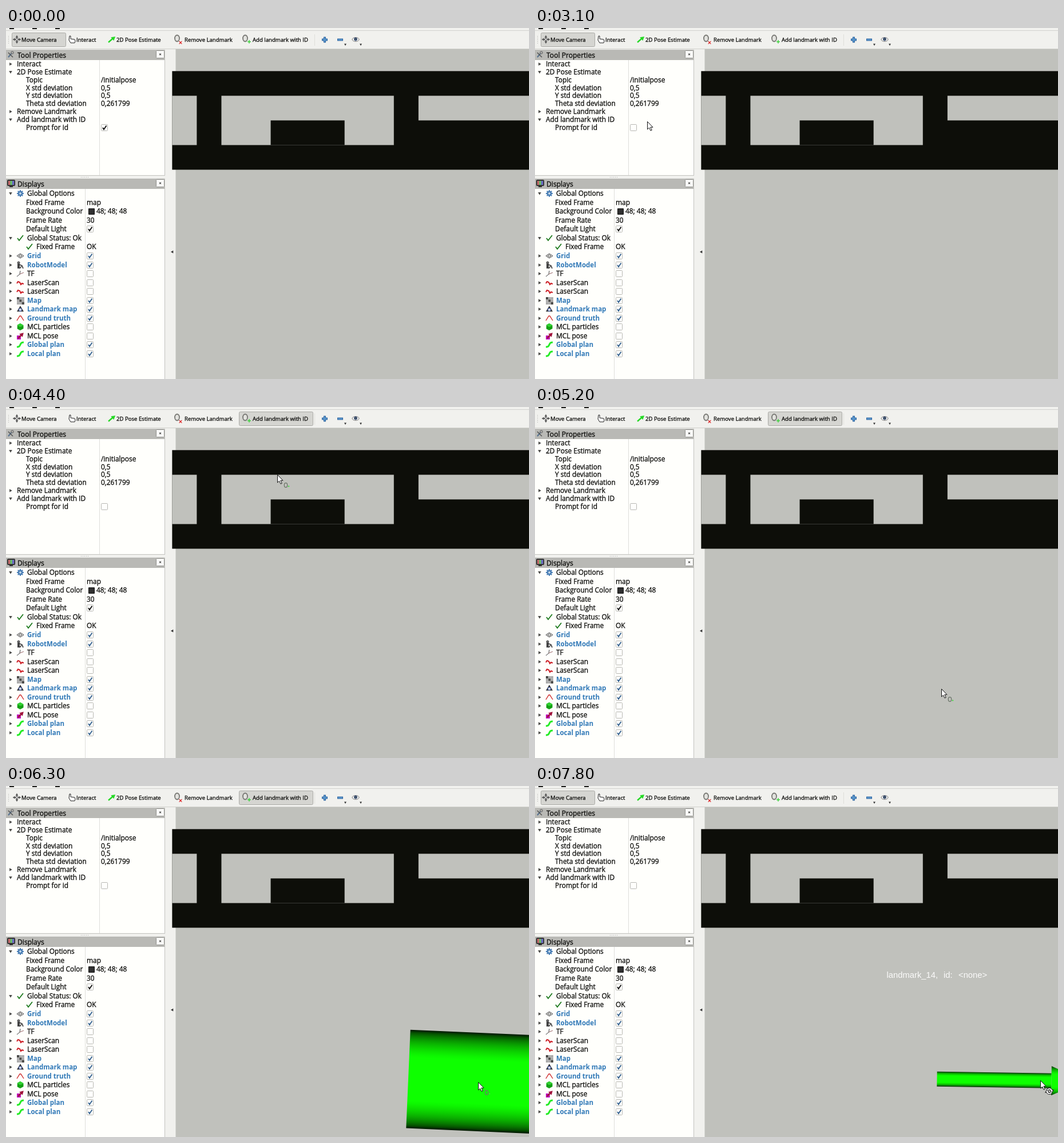
Write an HTML page with a canvas that moves like this. It is 914 px wide and 613 px high and loops after 8000 ms.

```html
<!DOCTYPE html>
<html lang="en">
<head>
<meta charset="utf-8">
<title>Adding a landmark</title>
<style>
html, body { margin: 0; width: 100%; height: 100%; overflow: hidden; background: #c0c1bc; }
canvas { display: block; }
</style>
</head>
<body>
<canvas id="stage" width="914" height="613"></canvas>
<script>
const g = document.getElementById('stage').getContext('2d');
const LOOP = 8000, STEP = 100;
const FONT = '"Open Sans", "Noto Sans", sans-serif';
const INK = '#0c0c0a', BLUE = '#2f78b7', PAPER = '#fffffc', BAR = '#f1f1ee', EDGE = '#c3c3bf';
const VIEW = { x: 296.5, y: 37, w: 618, h: 576 };
const ORIGIN = { x: 703, y: 511.7 };

// Key moments of the story
const APPEAR = 800, UNCHECK = 2400, HOVER = 3900, PICK = 4100;
const PRESS = 5500, DROP = 6600, PLACED = 6800;

// Pointer moves: start, end, target x, target y
const MOVES = [
  [800, 900, 62, 38], [1000, 1500, 167, 175], [1600, 1700, 169, 177],
  [1700, 1900, 169, 172], [3000, 3500, 425, 89], [3600, 3700, 440, 73],
  [3700, HOVER, 463, 19], [PICK, 4400, 474, 118], [4500, 5200, 710, 492],
  [5300, PRESS, ORIGIN.x, ORIGIN.y], [DROP, DROP, 871, 514],
  [PLACED, 7400, 889, 515], [7700, 7800, 883, 514]
];

const clamp = v => Math.max(0, Math.min(1, v));
const ease = k => k * k * (3 - 2 * k);

// The drag swings towards the horizontal while it gets longer
function drag(t) {
  const k = clamp((t - PRESS) / (DROP - PRESS));
  return { length: 168 * k, angle: .015 + .38 * (1 - k) ** 2 };
}

function pointerAt(t) {
  if (t > PRESS && t < DROP) {
    const { length, angle } = drag(t);
    return { x: ORIGIN.x + length * Math.cos(angle), y: ORIGIN.y + length * Math.sin(angle) };
  }
  const p = { x: 47, y: 11 };
  for (const [from, to, x, y] of MOVES) {
    if (t < from) break;
    const k = to > from ? ease(clamp((t - from) / (to - from))) : 1;
    p.x += (x - p.x) * k;
    p.y += (y - p.y) * k;
  }
  return p;
}

function rect(x, y, w, h, fill) {
  g.fillStyle = fill;
  g.fillRect(x, y, w, h);
}

function frame(x, y, w, h, fill, edge, r = 0) {
  g.beginPath();
  g.roundRect(x + .5, y + .5, w - 1, h - 1, r);
  paint(fill, edge);
}

function paint(fill, edge, width = 1) {
  if (fill) { g.fillStyle = fill; g.fill(); }
  if (edge) { g.strokeStyle = edge; g.lineWidth = width; g.stroke(); }
}

function text(s, x, y, size = 11.9, color = INK, weight = 400) {
  g.font = `${weight} ${size}px ${FONT}`;
  g.fillStyle = g.strokeStyle = color;
  g.fillText(s, x, y);
  if (weight > 400) return;
  g.lineWidth = .3;
  g.strokeText(s, x, y);
}

function trace(pts, close) {
  g.beginPath();
  for (let i = 0; i < pts.length; i += 2) g.lineTo(pts[i], pts[i + 1]);
  if (close) g.closePath();
}

function line(pts, color, width = 1) {
  trace(pts);
  paint(null, color, width);
}

function shape(pts, fill, edge) {
  trace(pts, true);
  paint(fill, edge);
}

function oval(x, y, rx, ry, fill, edge, width) {
  g.beginPath();
  g.ellipse(x, y, rx, ry, 0, 0, 7);
  paint(fill, edge, width);
}

function at(x, y, draw, turn = 0) {
  g.save();
  g.translate(x, y);
  g.rotate(turn);
  draw();
  g.restore();
}

// n copies of a drawing around a point
function around(n, x, y, draw) {
  for (let i = 0; i < n; i++) at(x, y, draw, i * 2 * Math.PI / n);
}

function plus(x, y, r, color, width, arms = 4) {
  around(arms, x, y, () => line([0, 0, r, 0], color, width));
}

function cross(x, y, r, color, width) {
  at(x, y, () => plus(0, 0, r, color, width), Math.PI / 4);
}

function triangle(x, y, r, color, turn = 0) {
  at(x, y, () => shape([-r, -r * .7, r, -r * .7, 0, r], color), turn);
}

function checkbox(x, y, on, color) {
  frame(x - 6, y - 6, 12, 12, PAPER, '#b7b7b3', 1);
  if (on) line([x - 3, y, x - 1, y + 3, x + 3.5, y - 3.5], color, 1.9);
}

function wave(color, width, steep) {
  g.beginPath();
  for (let x = -6; x <= 6; x++) g.lineTo(x, -steep * Math.tanh(x / 2));
  paint(null, color, width);
}

const ICONS = {
  gear() {
    around(8, 0, 0, () => line([0, 3, 0, 6], '#4b7fb5', 2));
    oval(0, 0, 3.2, 3.2, '#c5d9ea', '#4b7fb5', 2.6);
  },
  tick: () => line([-5, 0, -2, 4, 5, -5], '#1d7a1d', 1.8),
  scan: () => line([-6, 1, -4, -2, -1, -1, 1, 3, 3, 1, 6, 2], '#cc1d24', 2),
  plan: () => wave('#25ec25', 3, 4),
  grid() {
    for (const s of [1, .5]) shape([-6 * s, 0, 0, -4 * s, 6 * s, 0, 0, 4 * s], null, '#444');
  },
  robot() {
    oval(-3, -4, 2, 2, '#777', '#333');
    rect(-5, -2, 4, 8, '#444');
    line([-2, -1, 3, 1, 5, 6], '#333', 1.6);
    line([-1, 6, 2, 2], '#333', 1.4);
  },
  tf() {
    line([-6, 5, -1, 1, 0, -5], '#444');
    line([-1, 1, 6, -2], '#966');
  },
  map() {
    for (let i = 0; i < 9; i++)
      rect(-6 + i % 3 * 4.3, -6 + (i / 3 | 0) * 4.3, 4.3, 4.3, i % 4 ? '#aaa' : '#4a4a48');
  },
  mark() {
    triangle(0, 0, 6, '#333', Math.PI);
    oval(0, 1, 2.6, 2.6, '#ddd', '#3656b0');
  },
  truth: () => line([-6, 4, -1, -4, 1, -4, 6, 4], '#c22', 1.3),
  cube() {
    around(3, 0, 0, () => shape([0, 0, 5.5, -3, 5.5, 3, 0, 6], '#12a012'));
    shape([0, 0, 5.5, -3, 0, -6, -5.5, -3], '#2fd42f');
  },
  pose() {
    rect(-6, -1, 7, 7, '#c010c0');
    line([-4, 4, 4, -4], '#a0143c', 2.6);
    triangle(3, -3, 4, '#a0143c', -Math.PI * .75);
  }
};

// Toolbar icons, each drawn around its own centre
const TOOLS = [
  ['Move Camera', 27, 19, () => {
    around(4, 0, 0, () => { line([0, 1, 0, 5], '#777', 2); triangle(0, 5, 2.4, '#555'); });
    oval(0, 0, 2, 2, '#eee', '#555');
  }],
  ['Interact', 123, 115, () => {
    shape([-4, -6, -2, -6, -2, -1, 5, 0, 6, 3, 5, 6, -2, 6, -5, 1], '#fff', '#222');
  }],
  ['2D Pose Estimate', 193, 185, () => {
    line([-6, 5, 2, -2], '#25d925', 2.4);
    triangle(3, -2.5, 4, '#25d925', -2.25);
  }],
  ['Remove Landmark', 312, 299, () => { ring(); cross(6, 5.5, 3.3, '#d22', 1.2); }],
  ['Add landmark with ID', 431, 418, () => { ring(); plus(7, 4, 3, '#35d235', 1.4); }]
];
const ring = () => oval(0, -2, 4, 5.5, '#e2e2de', '#777773', 1.8);

function button(x, w, down) {
  frame(x, 8, w, 25, down ? '#d5d5d1' : '#f8f8f6', down ? '#aaaaa6' : '#bdbdb9', 2);
}

function toolbar(t) {
  for (let i = 0; i < 3; i++) rect(6 + i * 40, 0, 8, 2, '#20201e');
  rect(0, 4, 914, 1, '#d2d2ce');
  rect(0, 36, 914, 1, '#cfcfcb');
  for (let y = 14; y < 29; y += 3) rect(4, y, 1, 1, '#aaa');

  const adding = t >= PICK && t < PLACED;
  if (!adding) button(10, 95, true);
  if (adding || (t >= HOVER && t < PICK)) button(407, 130, adding);
  for (const [name, x, iconX, icon] of TOOLS) {
    at(iconX, 20, icon);
    text(name, x, 24, 9.6);
  }
  rect(539, 11, 1, 20, '#dededa');
  for (const [x, arms] of [[557, 4], [584, 2]]) {
    plus(x, 20.5, 5, '#285f9c', 4, arms);
    plus(x, 20.5, 4, '#5d9bd0', 2, arms);
  }
  oval(611, 20, 6, 3.5, '#f5f5f3', '#777');
  oval(611, 19.5, 2.5, 2.5, '#456', '#334b7a');
  for (const x of [593, 620]) triangle(x, 29, 2, '#333');
}

const TOOL_ROWS = [
  ['+', 'Interact'], ['-', '2D Pose Estimate'], ['', 'Topic', , '/initialpose'],
  ['', 'X std deviation', , '0,5'], ['', 'Y std deviation', , '0,5'],
  ['', 'Theta std deviation', , '0,261799'], ['+', 'Remove Landmark'],
  ['-', 'Add landmark with ID'], ['', 'Prompt for id', , true]
];

const DISPLAY_ROWS = [
  ['-', 'Global Options', 'gear'], ['', 'Fixed Frame', , 'map'],
  ['', 'Background Color', , '48; 48; 48'], ['', 'Frame Rate', , '30'],
  ['', 'Default Light', , true], ['-', 'Global Status: Ok', 'tick'],
  ['', 'Fixed Frame', 'tick', 'OK'], ['+', 'Grid', 'grid', true],
  ['+', 'RobotModel', 'robot', true], ['+', 'TF', 'tf', false],
  ['+', 'LaserScan', 'scan', false], ['+', 'LaserScan', 'scan', false],
  ['+', 'Map', 'map', true], ['+', 'Landmark map', 'mark', true],
  ['+', 'Ground truth', 'truth', true], ['+', 'MCL particles', 'cube', false],
  ['+', 'MCL pose', 'pose', false], ['+', 'Global plan', 'plan', true],
  ['+', 'Local plan', 'plan', true]
];

function row([branch, name, icon, value], y, valueX) {
  const blue = branch && value === true;
  const x = (branch ? 19 : 35) + (icon ? 18 : 0);
  if (branch) triangle(8, y, 2.8, '#4c4c49', branch === '+' ? -Math.PI / 2 : 0);
  if (icon) at(x - 12, y, ICONS[icon]);
  text(name, x, y + 4, blue ? 11.5 : 11.9, blue ? BLUE : INK, blue ? 700 : 400);
  if (typeof value === 'boolean') checkbox(valueX + 6, y, value, blue ? '#34618f' : '#111');
  else if (value) {
    const swatch = value.includes(';');
    if (swatch) frame(144, y - 5, 11, 11, '#303030', '#111');
    text(value, valueX + (swatch ? 17 : 0), y + 4);
  }
}

function panel(title, y, height, rows, firstY, pitch, valueX) {
  rect(0, y, 278, height, PAPER);
  rect(0, y, 278, 18, '#b9b9b5');
  text(title, 20, y + 13.5, 12.1);
  frame(262, y + 1, 15, 14, '#fafaf8', '#90908c', 1);
  cross(269.5, y + 8, 2, '#333', 1);
  rect(valueX - 3, y + 18, 1, height - 18, '#dededa');
  rect(277, y, 1, height, EDGE);
  rect(0, y + height, 278, 1, EDGE);
  rows.forEach((r, i) => row(r, Math.round(firstY + i * pitch), valueX));
}

function panels(t) {
  TOOL_ROWS.at(-1)[3] = t < UNCHECK;
  panel('Tool Properties', 38, 219, TOOL_ROWS, 63, 13.87, 166);
  panel('Displays', 263, 350, DISPLAY_ROWS, 289.2, 15.54, 141);
  line([4, 51, 10, 44], '#55718f', 2);
  line([4, 43, 12, 51], '#555', 1.6);
  oval(11, 43, 2, 2, null, '#777', 1.4);
  frame(2, 265, 14, 11, '#444', '#222', 1);
  for (let i = 0; i < 3; i++) rect(4 + i * 3.4, 267, 3.4, 7, `hsl(${i * 120} 45% 60%)`);
  rect(6, 276, 6, 2, '#333');
  for (let x = 131; x < 144; x += 3) rect(x, 260, 1, 1, '#aaa');
  triangle(290.5, 391, 2.6, '#333', Math.PI / 2);
}

function map() {
  const cell = 43.05, wall = '#0d0e09', floor = '#c0c1bc';
  const block = (col, row, w, h, fill) =>
    rect(333.4 + col * cell, 75.3 + row * cell, w * cell, h * cell, fill);
  rect(VIEW.x, VIEW.y, VIEW.w, VIEW.h, floor);
  block(-1, 0, 15, 4, wall);
  block(-1, 1, 1, 2, floor);
  block(1, 1, 7, 2, floor);
  block(3, 2, 3, 1, wall);
  block(9, 1, 5, 1, floor);
}

// Lit round body seen from the side
function shade(r) {
  const grad = g.createLinearGradient(0, -r, 0, r);
  for (let i = 0; i <= 32; i++) {
    const u = i / 16 - 1;
    const lit = Math.min(1, .08 + 1.08 * (1 - u * u) ** .7);
    grad.addColorStop(i / 32, `rgb(${14 * lit},${255 * lit},0)`);
  }
  return grad;
}

function landmark(t) {
  if (t <= PRESS) return;
  at(ORIGIN.x, ORIGIN.y, () => {
    if (t < PLACED) return rect(0, -86, 400, 172, shade(86));
    rect(-.5, -13, 200, 26, shade(13));
    shape([199.5, -25.5, 259, 0, 199.5, 25.5], shade(25.5));
  }, drag(t).angle);
  if (t < PLACED) return;
  g.font = '14.8px "Liberation Sans", Arial, sans-serif';
  g.fillStyle = '#fbfbfa';
  g.fillText('landmark_14,', 614.5, 335);
  g.fillText('id:', 714, 335);
  g.fillText('<none>', 740, 335);
}

function badge(t) {
  if (t >= PICK && t < PLACED) {
    oval(15, 18.5, 2.7, 3.8, null, '#6c756a', 1.3);
    plus(20, 20.5, 1.3, '#3ddc3d', 1);
    return;
  }
  for (const [color, width] of [['#222', 4], ['#fff', 2]]) {
    around(2, 16, 19, () => {
      g.beginPath();
      g.arc(0, 0, 4, .5, 3);
      paint(null, color, width);
      triangle(-4, 0, width, color, Math.PI);
    });
  }
}

function pointer(t) {
  if (t < APPEAR) return;
  const p = pointerAt(t);
  at(Math.round(p.x), Math.round(p.y), () => {
    shape([.5, .5, .5, 14, 3.5, 11.2, 6, 16.3, 8.2, 15.3, 5.8, 10.3, 10, 10.3], '#fff', '#111');
    if (p.x > VIEW.x && p.y > VIEW.y) badge(t);
  });
}

function draw(t) {
  rect(0, 0, 914, 613, BAR);
  toolbar(t);
  panels(t);
  map();
  landmark(t);
  pointer(t);
}

let start, shown = -1;
function tick(now) {
  start ??= now;
  const t = Math.floor((now - start) % LOOP / STEP) * STEP;
  if (t !== shown) draw(shown = t);
  requestAnimationFrame(tick);
}
draw(0);
requestAnimationFrame(tick);
</script>
</body>
</html>
```
